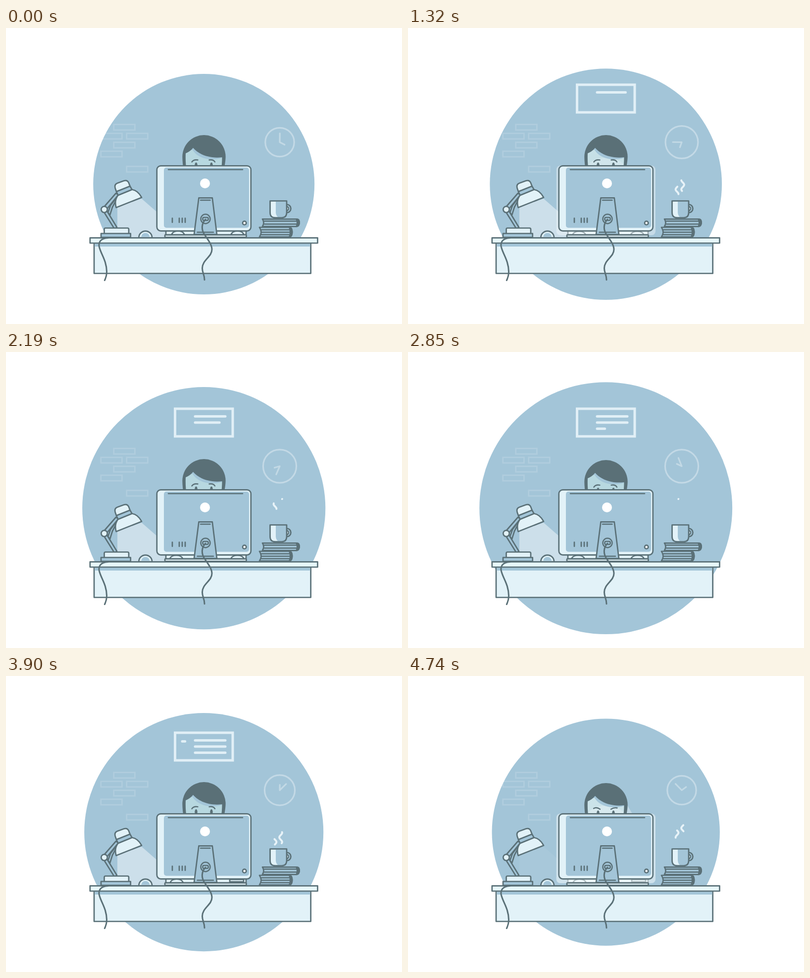
Recreate the animation shown at these times as an HTML page. Size 800 by 600 pixels, loop 4.77 s.

```html
<!DOCTYPE html>
<html lang="en">
<head>
<meta charset="utf-8">
<title>At the desk</title>
<style>
  html, body { margin: 0; width: 100%; height: 100%; overflow: hidden; background: #fff; }
  svg { display: block; width: 100vw; height: 100vh; }
  .ink { stroke: #5a7077; stroke-width: 2.7; stroke-linecap: round; stroke-linejoin: round; }
  .line { fill: none; }
  .pale { fill: #e2f2f8; }
  .blue { fill: #a3c5d8; }
  .dark { fill: #5a7077; }
  .thin { stroke-width: 2.4; }
  .bare { stroke: none; }
  .chalk { fill: none; stroke: #e1eff6; stroke-width: 5; }
  .round { stroke-linecap: round; stroke-linejoin: round; }
</style>
</head>
<body>
<svg viewBox="0 0 800 600">
  <circle id="disc" class="blue" cx="399.7" cy="316.6"/>

  <g id="bricks" fill="none" stroke="#fff" stroke-opacity=".14" stroke-width="2.8"></g>

  <g class="round" fill="none" stroke="#fff" stroke-opacity=".34" stroke-width="3.2">
    <circle id="dial" cx="553" cy="231.5"/>
    <path id="hands"/>
  </g>

  <g id="board" class="chalk">
    <rect x="341.5" y="115" width="116.5" height="56"/>
    <g id="rows" class="round"></g>
  </g>

  <path id="beam" fill="#fff" d="M225 362L274 346L330 395V425H225Z"/>

  <path id="ray" fill="#fff" d="M441 258L453 279H438Z"/>
  <g id="head">
    <path fill="#b7d8e0" d="M362 240H438V290H362Z"/>
    <g id="lit" fill="#fff">
      <path fill-opacity=".5" d="M362 240H438V290H362Z"/>
      <ellipse fill-opacity=".62" cx="400" cy="283" rx="37" ry="20"/>
    </g>
    <path class="blue" d="M370 248L378 242C392 257 414 263 437 261V263C416 270 388 266 377 247Z"/>
    <path class="dark" d="M356.3 261A43.7 43.9 0 0 1 443.7 261C443.5 270 442 277 440 290H434C436 280 436.5 270 436.5 262C412 265 390 257 378 243C373 249 368 252 363 254C362.5 266 363 278 365 290H359C357.5 280 356.3 270 356.3 261Z"/>
    <g id="face">
      <path id="brows" class="ink line thin"/>
      <g class="dark">
        <ellipse cx="384" cy="277.8" rx="2.7" ry="5.3"/>
        <ellipse cx="415" cy="277.8" rx="2.7" ry="5.3"/>
      </g>
    </g>
  </g>

  <g class="ink pale">
    <path d="M323 411H485V419H323Z"/>
    <path id="left"/>
    <path id="right"/>
  </g>
  <rect id="glow" fill="#f3f9fb" x="299.7" y="279" width="200.3" height="141" rx="8"/>
  <rect class="ink pale" x="321" y="419.3" width="164.5" height="5" rx="1"/>

  <g class="ink">
    <rect class="pale" x="304.8" y="279.3" width="190" height="132" rx="8"/>
    <rect class="blue bare" x="319" y="283" width="172" height="122" rx="5"/>
    <path class="line" d="M328 287H478"/>
    <circle class="bare" fill="#fff" cx="402" cy="315" r="10"/>
    <path class="line" d="M336 385.5V394M350 385.5V394M356 385.5V394M362 385.5V394"/>
    <circle fill="#fff" cx="481.7" cy="395.3" r="3.7"/>
    <path class="blue" d="M389.5 344.3H416.8L426 418.5H380Z"/>
    <path class="line thin" d="M393 349H412.5M386.5 414H419"/>
    <circle class="blue thin" cx="403" cy="387" r="9.5"/>
    <rect class="blue thin" x="397.3" y="384" width="11.5" height="6" rx="2.8"/>
  </g>

  <g class="ink">
    <path class="blue" d="M196 370L219 407L224 404L201 366Z"/>
    <path class="blue" d="M206 374L211 360L224 343L222 350L215 363L210 379Z"/>
    <path class="blue" d="M196 365L222 335L227 338L202 369Z"/>
    <circle class="pale" cx="198.5" cy="367.8" r="6.2"/>
    <path class="pale" d="M222.5 364L274 343.5C269 334 262 328.5 254.5 327.5L226.5 339C221 346 220 355 222.5 364Z"/>
    <path class="blue" d="M223 331.5L250.5 320.5L254.5 327.5L226.5 339Z"/>
    <path class="pale" d="M223 331.5L220.5 324.5Q218.5 317 225 314.5L238 309.7Q245 307.5 247.8 313.5L250.5 320.5Z"/>
    <rect class="pale" x="198.5" y="405.5" width="49.5" height="12" rx="2.5"/>
    <rect class="blue" x="192" y="416.5" width="59.7" height="7.8"/>
    <path class="pale" d="M268.3 425A13.4 13.4 0 0 1 295.1 425Z"/>
    <path class="blue bare" d="M273.3 423.5A8.4 8 0 0 1 290.1 423.5Z"/>
  </g>

  <g class="ink">
    <path class="blue" d="M518 387.3H588Q593 388 592.5 394.5Q592.5 401 588 402.3H518Q523 394.5 518 387.3Z"/>
    <path class="line thin" d="M522 391.5H587M522 397.5H587"/>
    <path class="dark bare" d="M585 387H589Q594 389 594 394.5Q594 400 589 402.5H585Q589 395 585 387Z"/>
    <path class="blue" d="M512 404H574Q578 405 578 413.5Q578 422 574 423.5H512Q519 414 512 404Z"/>
    <path class="line thin" d="M516 409H573M516 414H574M516 419H573"/>
    <path class="dark bare" d="M571 404H575Q579.5 406 579.5 413.5Q579.5 421 575 423.5H571Q575 414 571 404Z"/>
    <path class="blue" d="M567 357.5A8.5 8.5 0 0 1 567 374.5Z"/>
    <path class="pale thin" d="M567 362A4 4 0 0 1 567 370Z"/>
    <path class="blue" d="M533.5 350.5H567V374Q567 384.5 557 384.5H543.5Q533.5 384.5 533.5 374Z"/>
    <path class="pale bare" d="M535 352H545V374Q545.5 380 549 383H543.5Q535 383 535 374Z"/>
  </g>

  <g id="steam" class="round" fill="none" stroke="#e8f3f8" stroke-width="3.9"></g>

  <g class="ink">
    <rect class="pale" x="178" y="436" width="437.7" height="61.5"/>
    <path class="blue bare" d="M179.4 436H614.4V443H179.4Z"/>
    <rect fill="#e7f7fb" x="169.8" y="425.3" width="459.7" height="10.7"/>
    <g class="line" stroke-width="3">
      <path d="M206 425.5C190 426 185.5 436 189 446C193 460 203 472 203.5 494C203.5 503 201.5 507 199.3 511.5"/>
      <path d="M403 388C395 396 394.5 408 400 417C406 427 416 438 416 449C416 464 396.5 470 396.5 487C396.5 496 401 500 401 510.5"/>
    </g>
  </g>
</svg>
<script>
const LOOP = 4770;
const { sin, cos, abs, PI } = Math;
const $ = id => document.getElementById(id);
const set = (el, name, value) => el.setAttribute(name, value);

function add(parent, tag, attrs = {}) {
  const el = document.createElementNS('http://www.w3.org/2000/svg', tag);
  for (const key in attrs) set(el, key, attrs[key]);
  return parent.appendChild(el);
}

// Progress from 0 to 1 between two times, and eased forms of it.
const part = (t, from, to) => Math.min(1, Math.max(0, (t - from) / (to - from)));
const easeOut = (u, p = 2) => 1 - (1 - u) ** p;
const smooth = u => u * u * (3 - 2 * u);
const pulse = (t, a, b, c, d) => smooth(part(t, a, b)) - smooth(part(t, c, d));

// Bricks sit on a half-brick grid: column, row.
for (const [col, row] of [[1, 0], [0, 1], [2, 1], [1, 2], [0, 3], [2, 4.7]])
  add($('bricks'), 'rect', { x: 191.7 + 26 * col, y: 195.5 + 18.1 * row, width: 42.7, height: 11.3 });

const rows = [0, 1, 2].map(i => ({ x: 382, y: 130.5 + 12.5 * i, len: 61 }));
rows.push({ x: 356, y: 132.5, len: 12 });
for (const row of rows) row.el = add($('rows'), 'path');

const wisps = [
  { x: 543.5, from: 700, to: 2850, lead: .6 },
  { x: 555, from: 600, to: 2190, lead: .35 }
];
for (const wisp of wisps) wisp.el = add($('steam'), 'path');

function hand(deg, len) {
  const a = deg * PI / 180;
  return `${553 + len * sin(a)} ${231.5 - len * cos(a)}`;
}

// The tip of a wisp rises fast and its tail follows slowly along the same wave.
function wave({ x, from, to, lead }, t) {
  if (t < from || t > to + 30) return '';
  const u = part(t, from, to);
  const top = 343 - 45 * u ** lead;
  const span = 343 - 45 * u ** 1.6 - top + .01;
  const points = Array.from({ length: 21 }, (_, i) => {
    const y = top + span * i / 20;
    return `${x + 2.9 * cos((y - 317.7) / 18.8 * 2 * PI)} ${y}`;
  });
  return 'M' + points.join('L');
}

const knuckles = (x, y) => `M${x - 13} 419C${x - 10} ${y - 1} ${x + 10} ${y - 1} ${x + 13} 419Z`;

function draw(t) {
  const grow = part(t, 0, 2980) ** 1.4;
  const shrink = easeOut(part(t, 2980, LOOP), 1.2);
  set($('disc'), 'r', 223.5 + 34 * grow - 27.5 * shrink);
  set($('dial'), 'r', 29.2 + 4.4 * (easeOut(part(t, 0, 2200)) - smooth(part(t, 2900, 4500))));
  set($('hands'), 'd', `M${hand(t * .75, 18)}L553 231.5L${hand(117 + t / 16, 11)}`);

  const enter = easeOut(part(t, 580, 1080));
  const leave = smooth(part(t, 4250, 4550));
  set($('board'), 'transform', `translate(${60 * (enter - 1) + 50 * leave})`);
  set($('board'), 'opacity', pulse(t, 580, 760, 4250, 4550));
  rows.forEach(({ el, x, y, len }, i) => {
    const start = 840 + 940 * i;
    set(el, 'd', t < start ? '' : `M${x} ${y}h${len * part(t, start, start + 510) + .01}`);
  });

  const flare = part(t, 4580, 4740);
  const glow = .95 * pulse(t, 580, 680, 1140, 1480) + .55 * flare;
  set($('glow'), 'opacity', glow);
  set($('lit'), 'opacity', glow);
  set($('ray'), 'opacity', .33 * flare);
  set($('beam'), 'opacity', .44 - .38 * part(t, 4600, 4710));

  const nod = 2 * sin(2 * PI * part(t, 2250, 4500)) - 5.3 * pulse(t, 560, 740, 1000, 1250);
  set($('head'), 'transform', `translate(0 ${nod})`);
  set($('face'), 'transform', `translate(0 ${nod * .2})`);
  set($('brows'), 'd', t > 4400
    ? 'M375 268.5Q381 265 388 270M410 270Q416 266 422.5 267.5'
    : 'M375.5 271.5Q379 266 387.5 267.5M410.5 267.5Q419 266 422 271.5');

  const y = 410 + abs(sin(t / 95));
  set($('left'), 'd', knuckles(345.5 + 2 * cos(t / 900), y));
  set($('right'), 'd', t > 3400 ? 'M452 412.5H480V417H452Z' : knuckles(465 + 2.5 * cos(t / 340), y));

  for (const wisp of wisps) set(wisp.el, 'd', wave(wisp, t < 2900 ? t : t - 2950));
}

function tick() {
  draw(performance.now() % LOOP);
  requestAnimationFrame(tick);
}
tick();
</script>
</body>
</html>
```
